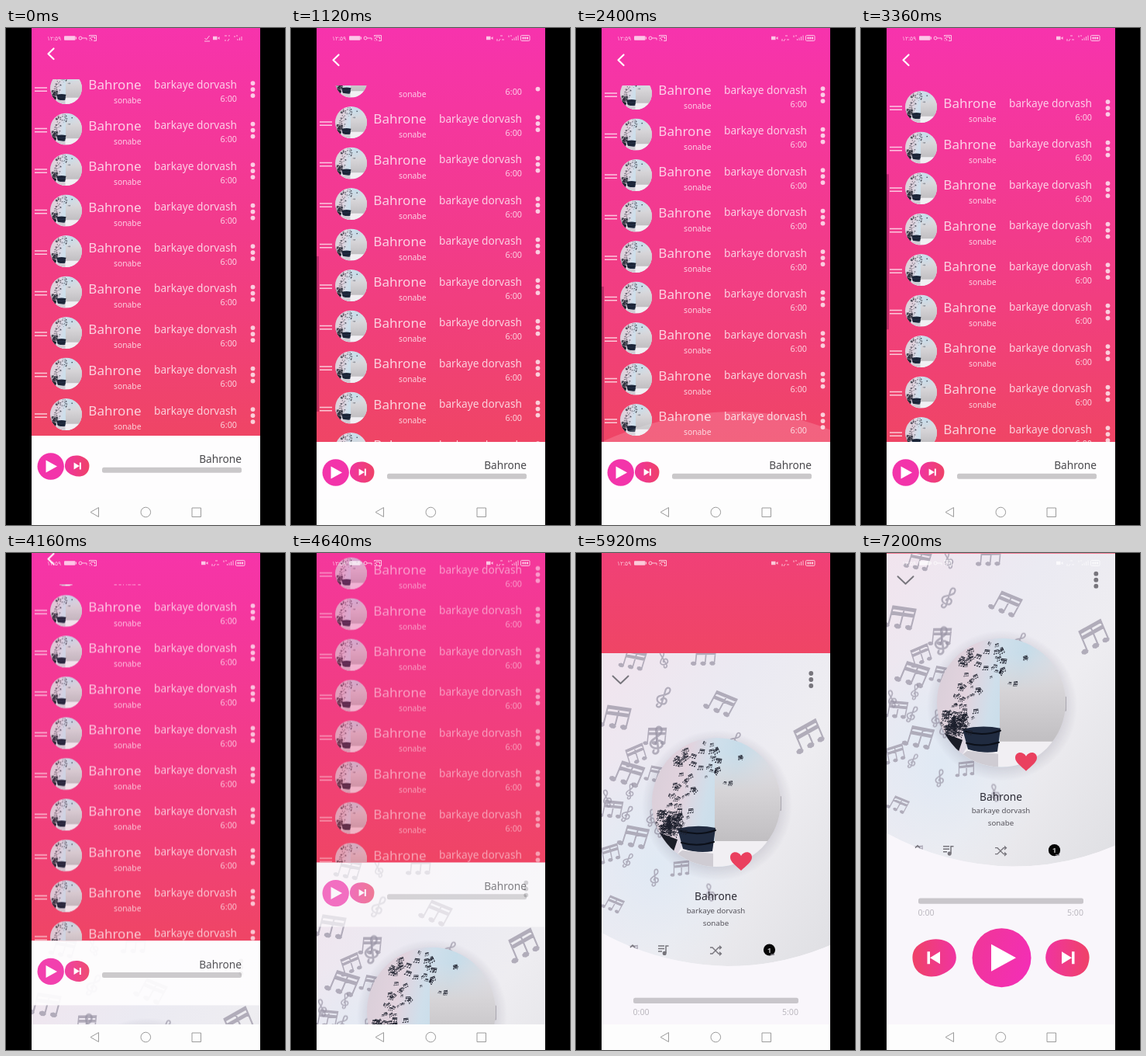
Recreate the animation shown at these times as an HTML page. Size 360 px wide and 640 px high, loop 7.36 s.

```html
<!DOCTYPE html>
<html lang="en">
<head>
<meta charset="utf-8">
<title>Music player</title>
<style>
  html, body { margin: 0; width: 100%; height: 100%; overflow: hidden; background: #000; }
  svg { display: block; width: 100vw; height: 100vh; }
  text { font-family: "Noto Sans", "Open Sans", sans-serif; }
  .end { text-anchor: end; }
  .mid { text-anchor: middle; }
  .line { fill: none; stroke-linecap: round; stroke-linejoin: round; }
</style>
</head>
<body>
<svg viewBox="0 0 360 640" xmlns="http://www.w3.org/2000/svg">
  <defs>
    <linearGradient id="wall" x2="0" y2="1">
      <stop offset="0" stop-color="#f733ad"/><stop offset=".5" stop-color="#f23b8b"/><stop offset="1" stop-color="#ef4565"/>
    </linearGradient>
    <linearGradient id="warm"><stop offset="0" stop-color="#f034a0"/><stop offset="1" stop-color="#ef4268"/></linearGradient>
    <linearGradient id="cool" x1="0" y1=".3" x2="1" y2=".7"><stop offset="0" stop-color="#f03699"/><stop offset="1" stop-color="#f42eb6"/></linearGradient>
    <linearGradient id="paper" x2="1" y2="1">
      <stop offset="0" stop-color="#f1e4ee"/><stop offset=".35" stop-color="#ebeaf2"/><stop offset=".6" stop-color="#eeedf1"/><stop offset="1" stop-color="#dfdfe3"/>
    </linearGradient>
    <radialGradient id="haze"><stop offset="0" stop-color="#e0e9f4"/><stop offset="1" stop-color="#e0e9f4" stop-opacity="0"/></radialGradient>
    <radialGradient id="shade"><stop offset=".8" stop-color="#55506a" stop-opacity=".17"/><stop offset="1" stop-color="#55506a" stop-opacity="0"/></radialGradient>
    <linearGradient id="sky" x2="1" y2=".2">
      <stop offset="0" stop-color="#d8ced8"/><stop offset=".3" stop-color="#e2d3de"/><stop offset=".5" stop-color="#cfdfeb"/><stop offset=".68" stop-color="#c6dce9"/><stop offset="1" stop-color="#e0dde2"/>
    </linearGradient>
    <linearGradient id="side" x2="0" y2="1"><stop offset=".15" stop-color="#dddbdf" stop-opacity="0"/><stop offset=".5" stop-color="#d6d4d7"/><stop offset="1" stop-color="#c0bec1"/></linearGradient>
    <clipPath id="disc"><circle r="83"/></clipPath>
    <clipPath id="phone"><rect x="33" width="295" height="640"/></clipPath>
    <clipPath id="view"><rect x="33" y="74" width="295" height="459"/></clipPath>
    <clipPath id="curve"><path id="bowl" d="M33 0H328V376Q265 403 195 403Q108 401 33 360Z"/></clipPath>

    <g id="cover" clip-path="url(#disc)">
      <rect x="-83" y="-83" width="166" height="166" fill="url(#sky)"/>
      <path d="M-2-83H83V52H-2Z" fill="url(#side)"/>
      <path d="M-40 50H83V83H-60Z" fill="#f1eff3"/>
      <path d="M-85 36L-66 42L-50 48L-62 84H-85Z" fill="#1a1d27"/>
      <path d="M-50 34Q-25 28 -1 33L-5 63Q-24 66-43 60Z" fill="#202b40"/>
      <path class="line" d="M-46 37Q-24 44-1 36M-45 52Q-24 58-3 51" stroke="#0b0f18" stroke-width="2"/>
      <path d="M-44 62L-4 66V83H-70Z" fill="#cfccd3"/>
      <path id="flock" fill="#1c1f2c"/>
    </g>
    <path id="clef" class="line" d="M-.12.42C-.22.6.12.6.06.36L-.08-.38C-.1-.6.18-.6.14-.34C.1-.12-.34-.02-.26.2C-.18.4.24.36.22.14C.2-.04-.08-.02-.06.16" stroke="#9a95a6" stroke-width=".085"/>
    <g id="dots"><circle cy="-8" r="2.9"/><circle r="2.9"/><circle cy="8" r="2.9"/></g>
    <path id="blob" d="M-26.5-8C-22-24-2-27 12-21.5C28-15 31-4 27 9C22 24 5 27-8 22C-24 16-31 6-26.5-8Z"/>
    <path id="skip" d="M-8-8L5 0L-8 8ZM5-8H8.5V8H5Z"/>
    <g id="next">
      <use href="#blob" fill="url(#warm)"/>
      <use href="#skip" x="1" fill="#fff"/>
    </g>
    <g id="row">
      <path d="M37-.5H53M37 3.7H53" stroke="#fff" stroke-width="1.5" opacity=".72"/>
      <use href="#cover" transform="translate(77.5 0) scale(.247)"/>
      <g class="end" fill="#fff" fill-opacity=".76">
        <text x="174.5" y="1.5" font-size="17" data-name="title"></text>
        <text x="174.5" y="19.8" font-size="10.3" data-name="artist"></text>
        <text x="298" y="0" font-size="13.7" data-name="album"></text>
        <text x="298" y="17.3" font-size="10.8">6:00</text>
      </g>
      <use href="#dots" x="318.5" y="1.6" fill="#fff" opacity=".75"/>
    </g>
  </defs>

  <rect width="360" height="640"/>
  <g clip-path="url(#phone)">
    <g id="home">
      <rect x="33" width="295" height="640" fill="#ef4565"/>
      <rect x="33" width="295" height="533" fill="url(#wall)"/>
      <g id="listing">
        <path class="line" d="M61.5 34.5L54.5 41.3L61.5 48" stroke="#fff" stroke-width="2.2"/>
        <g clip-path="url(#view)">
          <g id="rows"></g>
          <path id="glow" d="M33 533Q120 494 205 494T360 533Z" fill="#fff"/>
          <rect id="thumb" x="33" width="2.8" height="200" fill="#5c0a3c"/>
        </g>
      </g>
    </g>

    <g id="panel">
      <rect x="33" width="295" height="640" fill="#f9f6fb"/>
      <g clip-path="url(#curve)">
        <use href="#bowl" fill="url(#paper)"/>
        <ellipse cx="105" cy="270" rx="130" ry="150" fill="url(#haze)"/>
        <path id="notes" fill="#9a95a6" opacity=".72"/>
        <g id="clefs" opacity=".72"></g>
      </g>
      <circle cx="182" cy="196" r="97" fill="url(#shade)"/>
      <rect x="260" y="184" width="5" height="19" rx="1" fill="#aaa7b0"/>
      <use href="#cover" x="181" y="192"/>
      <path d="M213 280C207 274 199 269 199 263C199 255 209 254 213 261C217 254 227 255 227 263C227 269 219 274 213 280Z" fill="#ea405f"/>
      <path id="fold" class="line" d="M47.5 29.5L57.5 39L67.5 29.5" stroke="#77757c" stroke-width="1.9"/>
      <use href="#dots" x="303.3" y="34" fill="#77757c"/>
      <g class="mid">
        <text x="180.5" y="318" font-size="13.7" font-weight="500" fill="#2c2b35" data-name="title"></text>
        <text x="180.5" y="334.5" font-size="9.7" fill="#56545c" data-name="album"></text>
        <text x="180.5" y="350.5" font-size="9.7" fill="#56545c" data-name="artist"></text>
      </g>
      <g stroke="#77757c" stroke-width="1.5" fill="none">
        <path d="M106 377H114M106 380.5H114M106 384H111M116 386V377H119.5"/>
        <circle cx="114.2" cy="386.4" r="1.8" fill="#77757c"/>
        <path d="M173 379H176L184 387H187M173 387H176L184 379H187M185 376.7L187.5 379L185 381.3M185 384.7L187.5 387L185 389.3" stroke-width="1.3"/>
        <path d="M70 379L73 376L76 379"/>
      </g>
      <circle cx="249.5" cy="382" r="7.6" fill="#050505"/>
      <text class="mid" x="249.5" y="385.6" font-size="9.5" font-weight="600" fill="#bbb">1</text>
      <path d="M251 388H256" stroke="#77757c" stroke-width="1.5"/>
      <rect x="74" y="443.8" width="213" height="7.2" rx="2.5" fill="#c9c6cb"/>
      <g font-size="10.6" fill="#bcb9c0"><text x="73.5" y="466">0:00</text><text class="end" x="287" y="466">5:00</text></g>
      <use href="#next" transform="translate(95 520.5) scale(-1 1)"/>
      <use href="#next" x="266" y="520.5"/>
      <circle cx="181.5" cy="520.5" r="38" fill="url(#cool)"/>
      <path d="M168 503L200 520.5L168 538Z" fill="#fff"/>

      <g id="mini">
        <rect x="33" width="295" height="83" fill="#fefdfe"/>
        <circle cx="57.7" cy="39.5" r="17.2" fill="#f334aa"/>
        <path d="M51.5 31.5L66 39.5L51.5 47.5Z" fill="#fff"/>
        <use href="#next" transform="translate(91.5 39) scale(.56)"/>
        <text class="end" x="304" y="35.2" font-size="13.7" fill="#4a494d" data-name="title"></text>
        <rect x="124" y="40.7" width="180" height="7" rx="2.5" fill="#cac8ca"/>
      </g>
    </g>

    <g fill="none" stroke="#fff" opacity=".72">
      <text x="53" y="16" font-size="7.5" fill="#fff" stroke="none">۱۲:۵۹</text>
      <rect x="75" y="10.2" width="14.5" height="5.6" rx="1" fill="#fff" stroke="none"/><path d="M90.5 11.5V14.5"/>
      <circle cx="96" cy="13" r="2"/><path d="M98 13H104V15.5"/>
      <path d="M107.5 11V9.5H116.5V16.5H113M107.5 13Q111 13 111 16.5M107.5 15.5L108.5 16.5M109 11.5H114.5V14.5"/>
      <g id="early">
        <path d="M256.5 13L258.5 15L262.5 10M256 17H263"/>
        <path d="M267 10.8H272.5V15.2H267ZM273 13L275.5 11V15Z" fill="#fff" stroke="none"/>
        <path d="M282 10H285M287 10H289M282 16H284M286 17L288 14M295 10V12M297 10H299M299 16V14M301.5 16V12.5M304 16V11" stroke-width=".9"/>
      </g>
      <g id="late">
        <path d="M252 10.8H257.5V15.2H252ZM258 13L260.5 11V15Z" fill="#fff" stroke="none"/>
        <path d="M266 17V14M268 17L270 14M272 15H275M270 10H273M281 9.5V12M283 10H285M285.5 16V14M288 16V12.5M290.5 16V11M293 16V9.5" stroke-width=".9"/>
        <rect x="296.5" y="9.5" width="11.5" height="7" rx="1.2"/><path d="M298.5 13H306" stroke-width="3" stroke-dasharray="2 .8"/>
      </g>
    </g>

    <rect x="33" y="607" width="295" height="33" fill="#fdfdfd"/>
    <path d="M119.5 617.5V629.5L109 623.5ZM240 618H251.5V629.5H240Z" fill="none" stroke="#9b9b9b"/>
    <circle cx="180.3" cy="623.5" r="6.3" fill="none" stroke="#9b9b9b"/>
  </g>
</svg>
<script>
const $ = id => document.getElementById(id);
const names = { title: "Bahrone", artist: "sonabe", album: "barkaye dorvash" };
document.querySelectorAll("[data-name]").forEach(el => el.textContent = names[el.dataset.name]);

const LOOP = 7360, STEP = 160, CLOSED = 533, PITCH = 52.5, MAX_SCROLL = 594;

let seed = 11;
const rand = () => (seed = seed * 16807 % 2147483647) / 2147483647;
const spread = w => (rand() + rand() - 1) * w;

// Scrap of beamed notes as polygons in a unit box.
const rect = (x, y, w, h) => [[x, y], [x + w, y], [x + w, y + h], [x, y + h]];
const head = (x, y) => Array.from({ length: 7 }, (_, i) => {
  const a = i * Math.PI * 2 / 7;
  return [x + .14 * Math.cos(a), y + .1 * Math.sin(a)];
});
const beam = y => [[-.42, y], [.5, y - .1], [.5, y + .04], [-.42, y + .14]];
const shapes = [
  beam(-.42), beam(-.2),
  rect(-.42, -.4, .06, .75), rect(.02, -.45, .06, .75), rect(.44, -.5, .06, .75),
  head(-.48, .35), head(-.04, .3), head(.38, .25)
];

function note(x, y, size, turn) {
  const c = Math.cos(turn) * size, s = Math.sin(turn) * size;
  return shapes.map(p => "M" + p.map(([a, b]) =>
    (x + a * c - b * s).toFixed(1) + " " + (y + a * s + b * c).toFixed(1)).join("L") + "Z").join("");
}

// Swarms inside the cover: centre, spread, count.
const swarms = [[-60, 30, 24, 18, 70], [-52, 6, 28, 26, 18], [-42, -20, 26, 22, 15], [-41, -59, 18, 16, 16], [-10, -62, 20, 18, 9], [-4, -42, 20, 18, 9], [31, -54, 5, 5, 3], [14, -24, 6, 6, 3]];
$("flock").setAttribute("d", swarms.map(([x, y, w, h, n]) =>
  Array.from({ length: n }, () => note(x + spread(w), y + spread(h), 3 + rand() * 4.5, spread(1.2))).join("")).join(""));

const pairs = [[74, 10, 28, .3], [166, 5, 28, .1], [51, 84, 34, .25], [187, 66, 32, .5], [300, 108, 36, -.4], [77, 132, 26, -.3], [67, 157, 34, .4], [46, 202, 26, .2], [104, 157, 24, .3], [75, 238, 32, .3], [44, 259, 24, -.2], [135, 278, 22, 0], [48, 324, 22, .5], [103, 108, 26, .1], [73, 383, 14, 0]];
$("notes").setAttribute("d", pairs.map(p => note(...p)).join(""));

const clefs = [[113, 8, 20], [113, 57, 26], [105, 112, 32], [40, 187, 20], [66, 207, 20], [97, 212, 20], [106, 226, 20], [67, 267, 18], [102, 289, 20], [173, 308, 20], [205, 112, 20], [70, 178, 18]];
$("clefs").innerHTML = clefs.map(([x, y, s], i) =>
  `<use href="#clef" transform="translate(${x} ${y}) rotate(${i * 47 % 70 - 20}) scale(${s})"/>`).join("");

$("rows").innerHTML = Array.from({ length: 20 }, (_, i) => `<use href="#row" y="${101 + i * PITCH}"/>`).join("");

const tracks = {
  panel: [[0, 525], [160, 533], [4000, 533], [4640, 398.6], [5920, 129], [6560, .7]],
  scroll: [[0, 278], [320, 278], [640, 390], [1120, 504.5], [1760, 565], [2240, 594], [2400, 594], [2720, 480], [3040, 340], [3360, 262], [3680, 255.5]],
  glow: [[2080, 0], [2400, .16], [2720, 0]],
  thumb: [[160, 0], [480, .4], [3360, .4], [3680, 0]]
};

function at(track, t) {
  if (t <= track[0][0]) return track[0][1];
  for (let i = 1; i < track.length; i++) {
    const [t0, v0] = track[i - 1], [t1, v1] = track[i];
    if (t <= t1) return v0 + (v1 - v0) * (t - t0) / (t1 - t0);
  }
  return track[track.length - 1][1];
}

const shift = (id, y) => $(id).setAttribute("transform", `translate(0 ${y})`);
const fade = (id, v) => $(id).setAttribute("opacity", v);

function draw(t) {
  const top = at(tracks.panel, t), scroll = at(tracks.scroll, t);
  const visible = Math.max(0, 1 - 1.4 * Math.max(0, CLOSED - 8 - top) / CLOSED);
  shift("home", top - CLOSED);
  shift("panel", top);
  shift("rows", -scroll);
  shift("thumb", 74 + 259 * scroll / MAX_SCROLL);
  fade("listing", visible);
  fade("mini", visible);
  fade("fold", Math.max(0, 1 - 1.5 * visible));
  fade("glow", at(tracks.glow, t));
  fade("thumb", at(tracks.thumb, t));
  fade("early", t < 640 ? 1 : 0);
  fade("late", t < 640 ? 0 : 1);
}

const start = performance.now();
let last = -1;
function tick() {
  const t = Math.floor((performance.now() - start) % LOOP / STEP) * STEP;
  if (t !== last) draw(last = t);
  requestAnimationFrame(tick);
}
tick();
</script>
</body>
</html>
```
